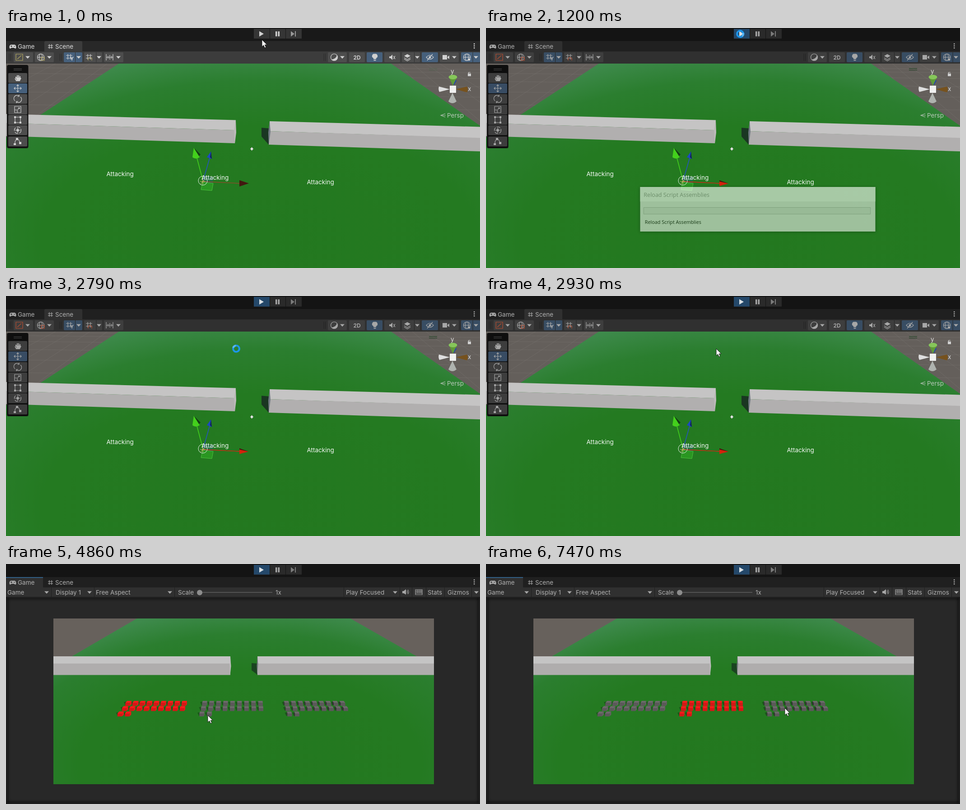
An HTML page for the animation above (8000 ms loop, 1050 by 533 pixels).

```html
<!DOCTYPE html>
<html lang="en">
<head>
<meta charset="utf-8">
<title>Selecting groups in a game editor</title>
<style>
html, body { margin: 0; width: 100%; height: 100%; overflow: hidden; background: #282828; }
svg { display: block; width: 1050px; height: 533px; }
text { font: 13.5px Inter, sans-serif; fill: #dcdcdc; white-space: pre; }
.label { fill: #f4f8f4; }
.line { fill: none; stroke: #d0d0d0; stroke-width: 1.2; }
.solid { fill: #d0d0d0; }
.btn { fill: #4d4d4d; }
.on { fill: #46607c; }
.warn { stroke: #b4a860; }

/* hard switches */
.edit, .game, .idle, .play, .arrow, .busy, #left, #mid { animation: 8s step-end infinite; }
.edit { animation-name: edit; }
.game { animation-name: game; }
.idle { animation-name: idle; }
.play { animation-name: play; }
.arrow { animation-name: arrow; }
.busy { animation-name: busy; }
.warn { animation: warn 8s step-end infinite; }
.squad { color: #6d696b; }
#left { animation-name: pickLeft; }
#mid { animation-name: pickMid; }
@keyframes edit { 0% { visibility: visible } 40.7%, 100% { visibility: hidden } }
@keyframes game { 0% { visibility: hidden } 40.7%, 100% { visibility: visible } }
@keyframes idle { 0% { visibility: visible } 10.8%, 100% { visibility: hidden } }
@keyframes play { 0% { visibility: hidden } 10.8%, 100% { visibility: visible } }
@keyframes arrow { 0% { visibility: visible } 10.8% { visibility: hidden } 34.9%, 100% { visibility: visible } }
@keyframes busy { 0% { visibility: hidden } 10.8% { visibility: visible } 34.9%, 100% { visibility: hidden } }
@keyframes warn { 0% { stroke: #b4a860 } 10.8%, 100% { stroke: #e8603c } }
@keyframes pickLeft { 0% { color: #6d696b } 52.1% { color: #ff1a1a } 65% { color: #6d696b } 100% { color: #6d696b } }
@keyframes pickMid { 0% { color: #6d696b } 81.6%, 100% { color: #ff1a1a } }

/* motion */
#drop { transform-origin: 527px 320px; animation: drop 8s linear infinite; }
@keyframes drop {
  0%, 40.8% { transform: translateY(-3.5px) scaleX(1.012) }
  43.5%, 100% { transform: none }
}
#dialog { transform-origin: 601.5px 402px; animation: dialog 8s linear infinite; }
@keyframes dialog {
  0%, 14% { opacity: 0; transform: scale(.965) }
  15% { opacity: .6; transform: scale(.981) }
  16.6%, 31.2% { opacity: 1; transform: none }
  34.2%, 100% { opacity: 0; transform: scale(.96) }
}
#pointer { animation: pointer 8s linear infinite; }
@keyframes pointer {
  0%, .86% { transform: translate(567px, 26px) }
  .87%, 2.4% { transform: translate(567px, 24px) }
  5.87%, 17% { transform: translate(563px, 13px) }
  20.2%, 40.69% { transform: translate(510px, 117px) }
  40.7%, 41.5% { transform: translate(509px, 121px) }
  43.75% { transform: translate(500px, 147px) }
  48.87%, 51.3% { transform: translate(338px, 303px) }
  57.5% { transform: translate(458px, 331px) }
  60.7%, 61.5% { transform: translate(447px, 336px) }
  67.5% { transform: translate(491px, 325px) }
  71.6%, 74.9% { transform: translate(466px, 309px) }
  77.5% { transform: translate(488px, 311px) }
  79.1%, 86.7% { transform: translate(484px, 320px) }
  89.1%, 90% { transform: translate(703px, 340px) }
  93.3%, 100% { transform: translate(662px, 320px) }
}
#ring { animation: spin 1s linear infinite; }
@keyframes spin { to { transform: rotate(360deg) } }
</style>
</head>
<body>
<svg viewBox="0 0 1050 533">
  <defs>
    <radialGradient id="grass">
      <stop offset="0" stop-color="#23781f"/>
      <stop offset=".6" stop-color="#247a21"/>
      <stop offset=".84" stop-color="#2b7e2f"/>
      <stop offset="1" stop-color="#3e8a4c"/>
    </radialGradient>
    <radialGradient id="field" href="#grass" gradientUnits="userSpaceOnUse" cx="0" cy="0" r="1" gradientTransform="translate(560 470) scale(800 420)"/>
    <radialGradient id="arena" href="#grass" gradientUnits="userSpaceOnUse" cx="0" cy="0" r="1" gradientTransform="translate(540 445) scale(630 345)"/>
    <filter id="soft"><feGaussianBlur stdDeviation="4"/></filter>
    <clipPath id="pane"><path d="M0 73H1050V533H0Z"/></clipPath>
    <clipPath id="screen"><path d="M105 121H948V489H105Z"/></clipPath>
    <path id="caret" class="solid" d="M-5-2.5H5L0 3Z"/>
    <path id="grip" d="M0 57V73M3.5 57V73" stroke="#2a2a2a" stroke-width="1"/>
    <g id="globe" class="line"><circle r="7.5"/><ellipse rx="3.5" ry="7.5"/><path d="M-7.5 0H7.5"/></g>
    <path id="lattice" class="line" d="M-3-6V6M3-6V6M-7-3H7M-7 3H7"/>
  </defs>

  <!-- scene view -->
  <g class="edit">
    <path d="M0 79H1050V533H0Z" fill="#645f5b"/>
    <path id="gridlines" stroke="#8a8682" stroke-opacity=".25" fill="none"/>
    <path d="M250 79H853L1050 217V533H0V243Z" fill="url(#field)"/>
    <path d="M0 191 509 204.500 508 227 0 211Z" fill="#c5c4c4"/>
    <path d="M0 211 508 227 507 256 0 240Z" fill="#b1afaf"/>
    <path d="M509 205 505 227 507 256 510 232Z" fill="#bcbaba"/>
    <path d="M566 221.500 584 223 582 259 566 241Z" fill="#1a3722"/>
    <path d="M584 207 1050 219.500V245L584 229Z" fill="#c5c4c4"/>
    <path d="M583 229 1050 244V274L582 259Z" fill="#b1afaf"/>
    <path d="M584 207 586 230 582 259 581 232Z" fill="#747b85"/>
    <path d="M544.500 264.500 548 268.500 544.500 272.500 541 268.500Z" fill="#e8ece8" stroke="#6c8a6c"/>

    <!-- move handles -->
    <path d="M436 342 459 345 456 361 432 359Z" fill="#2fae25" fill-opacity=".55" stroke="#4bc23c"/>
    <path d="M438 328 460 331 458 345 437 342Z" fill="#2a58b0" fill-opacity=".25"/>
    <path d="M437 338 451 289" stroke="#2550c8" stroke-width="1.5"/>
    <path d="M454 274 445 287 456 291Z" fill="#1e48c0"/><path d="M454 274 452 287 456 291Z" fill="#102450"/>
    <path d="M436 338 423 289" stroke="#45d41c" stroke-width="1.5"/>
    <path d="M416 266 431 281 424 287Z" fill="#123c12"/><path d="M416 266 413 287Q420 293 429 287Z" fill="#43d01c"/>
    <path d="M437 341 517 345" stroke="#92482a" stroke-width="1.300"/>
    <path class="idle" d="M517 338 538 345 517 352Z" fill="#421810"/>
    <g class="play">
      <path d="M437 341 517 345" stroke="#c22c12" stroke-width="1.300"/>
      <path d="M517 338 536 345 517 347Z" fill="#421810"/><path d="M517 341 537 345.500 517 351Z" fill="#d0240c"/>
    </g>
    <circle cx="436" cy="339" r="10" fill="none" stroke="#e4eee4"/>
    <path d="M430 341H442M436 334V347M431 347 441 335" stroke="#d8c070"/>
    <text class="label" x="222.500" y="328.500">Attacking</text>
    <text class="label" x="433" y="336.500">Attacking</text>
    <text class="label" x="666.500" y="346.500">Attacking</text>

    <!-- orientation gizmo -->
    <path d="M991 126 997 116" stroke="#2646a8" stroke-width="3"/>
    <path d="M959 130Q957 136 960 142L983 136Z" fill="#dedede"/>
    <path d="M1021 130Q1025 136 1021 143L997 136Z" fill="#76521e"/>
    <path d="M981 109 990 128 999 109Z" fill="#5f9a38"/><ellipse cx="990" cy="109" rx="9.500" ry="5" fill="#86c65a"/>
    <path d="M980 163 989 144 998 163Q989 171 980 163Z" fill="#aeb2ae"/>
    <path d="M983 128H997V144H983Z" fill="#f0f0f0"/>
    <text x="985" y="101">y</text><text x="1023" y="140">x</text>
    <path d="M1023 101H1030V107H1023Z" class="solid"/><path d="M1024.500 101V98.500H1029" class="line"/>
    <path d="M973 190 963 194 973 198M964 194H974" class="line" stroke-opacity=".75"/>
    <text x="977" y="199" fill-opacity=".8">Persp</text>
    <path d="M937 90H955M937 93.500H955" stroke="#3c6040" stroke-opacity=".5"/>
    <path class="play" d="M937 90H955M937 93.500H955" stroke="#1c3c20"/>

    <!-- chrome -->
    <path d="M0 0H1050V29H0Z" fill="#191919"/><path d="M0 29H1050V52H0Z" fill="#282828"/>
    <path d="M85 52V32Q85 29 88 29H166Q169 29 169 32V52H1050V79H0V52Z" fill="#3c3c3c"/>
    <rect x="2" y="82" width="47.500" height="185" rx="4" fill="#121212"/>
    <path d="M17 90.500H35M17 93.500H35" stroke="#555"/>
    <g id="buttons"></g>
    <use href="#grip" x="7"/><use href="#grip" x="119"/><use href="#grip" x="704"/>
    <path class="line warn" d="M22 58H37V72H22ZM25 69 34 61"/>
    <use href="#globe" x="77" y="65"/><path class="line warn" d="M78 65H85V72H78Z"/>
    <use href="#lattice" x="140" y="64"/><text x="142" y="72" style="font-size:11px;font-weight:700">Y</text>
    <use href="#lattice" x="184" y="64"/><path class="line warn" d="M182 72V68Q186 62 190 68V72" stroke-width="2"/>
    <path class="line" d="M222 58V72M226 62V68M230 60V70M234 62V68M237 58V72M222 65H237"/>
    <circle class="line" cx="727" cy="65" r="7.500"/><path class="solid" d="M721 70A7.500 7.500 0 0 0 733 60Q732 68 721 70Z"/>
    <text x="769.500" y="69.500" style="font-size:12px;font-weight:600">2D</text>
    <path class="solid" d="M817 57.500A5 5 0 0 1 820 67V69H814V67A5 5 0 0 1 817 57.500ZM814.500 70.500H819.500V72.500H814.500Z"/>
    <path class="solid" d="M849 63H852L856 59V71L852 67H849Z"/><path class="line" d="M858 62 862 69M862 62 858 69"/>
    <path class="solid" d="M882 62 889 58 896 62 889 66Z"/><path class="line" d="M882 66 889 70 896 66M882 69 889 73 896 69"/>
    <path class="line" d="M931 65Q939 56 947 65Q939 74 931 65ZM933 72 945 58" stroke-width="1.500"/><circle class="solid" cx="939" cy="65" r="2.500"/>
    <path class="solid" d="M967 60H977V70H967ZM978 64 982 61V69L978 66Z"/>
    <use href="#globe" x="1021" y="65"/><circle class="solid" cx="1026" cy="70" r="2.500"/>
    <!-- palette icons -->
    <path d="M22 108V112M25 105V112M28 105V112M31 107V112M20 112 23 117H30L33 111" fill="none" stroke="#d0d0d0" stroke-width="2"/><path class="solid" d="M22 110H32L30 117H24Z"/>
    <path class="line" d="M26 126V142M18 134H34M23.500 128.500 26 126 28.500 128.500M23.500 139.500 26 142 28.500 139.500M20.500 131.500 18 134 20.500 136.500M31.500 131.500 34 134 31.500 136.500"/>
    <path class="line" d="M20 162A7 7 0 0 1 29 151M32 153A7 7 0 0 1 23 164M29 148V152H25M23 167V163H27"/>
    <path class="line" d="M19 174H33V188H19ZM19 182H25V188M26 181 30 177M27 177H30V180"/>
    <path class="line" d="M20 198H32V210H20Z"/><path class="solid" d="M18 196H22V200H18ZM30 196H34V200H30ZM18 208H22V212H18ZM30 208H34V212H30Z"/>
    <circle class="line" cx="26" cy="227" r="7.500" stroke-dasharray="8 3"/><path class="line" d="M26 221V233M20 227H32"/><path class="solid" d="M23.500 224.500H28.500V229.500H23.500Z"/>
    <path class="line" d="M20 257Q19 249 25 247Q30 248 30 254"/><path class="solid" d="M17 256H22V260H17ZM22 244H27V249H22ZM29 253H34V258H29Z"/>
  </g>

  <!-- game view -->
  <g class="game">
    <path d="M0 0H1050V29H0Z" fill="#191919"/><path d="M0 29H1050V52H0Z" fill="#282828"/>
    <path d="M0 29H82V52H1050V73H0Z" fill="#3c3c3c"/><path d="M0 29H82V31H0Z" fill="#3f78a8"/>
    <path d="M0 73H1050V533H0Z" fill="#282828"/>
    <g clip-path="url(#pane)"><path d="M-1 72H1051V534H-1Z" fill="none" stroke="#111" stroke-width="7" filter="url(#soft)"/></g>
    <g id="bar"></g>
    <path d="M429 63H590" stroke="#686868" stroke-width="2"/><circle cx="429" cy="63.500" r="6" fill="#b0b0b0"/>
    <path class="solid" d="M878 60H881L886 56V68L881 65H878Z"/><path class="line" d="M888 59Q890.500 62 888 65M890 57Q894 62 890 67"/>
    <path class="line" d="M907 57H922V68H907ZM907 60.500H922M907 64.500H922M911 57V64M915 57V64M919 57V64"/>
    <g clip-path="url(#screen)">
      <path d="M105 121H948V489H105Z" fill="#67615c"/>
      <path d="M290 121H763L948 227V489H105V229Z" fill="url(#arena)"/>
      <path d="M105 205H497V221H105Z" fill="#c4c4c4"/><path d="M105 221H497V246.500H105Z" fill="#afadad"/>
      <path d="M497 205 495.500 222 496.500 246.500 498.500 227Z" fill="#c0bebe"/>
      <path d="M544 220 557 221V246L544 236Z" fill="#1a4420"/>
      <path d="M557 205H948V221H557Z" fill="#c4c4c4"/><path d="M557 221H948V246.500H557Z" fill="#afadad"/>
      <path d="M557 205 558.500 222 556.500 246.500 555.500 226Z" fill="#747a7c"/>
      <g id="drop"><g class="squad" id="left"></g><g class="squad" id="mid"></g><g class="squad" id="right"></g></g>
    </g>
  </g>

  <!-- shared chrome -->
  <text x="26" y="45.500">Game</text><text x="109" y="45.500">Scene</text>
  <path class="solid" d="M11 37H19Q23 38 22.500 44Q21 47.500 18 44H12Q9 47.500 7.500 44Q7 38 11 37Z"/>
  <path d="M10 40.500H14M12 38.500V42.500M17 40.500H20" stroke="#282828"/>
  <path class="line" d="M96 36V46M101 36V46M93 39H104M93 43.500H104"/>
  <path class="solid" d="M1036 34H1038.500V36.500H1036ZM1036 38.500H1038.500V41H1036ZM1036 43H1038.500V45.500H1036Z"/>
  <path d="M549 2H584V23.500H549ZM585 2H619V23.500H585ZM620 2H655V23.500H620Z" fill="#353535"/>
  <path class="solid" d="M561 7 571 13 561 19ZM597 7.500H600.500V18.500H597ZM602.500 7.500H606V18.500H602.500Z"/>
  <path d="M631 7 639 13 631 19ZM640 7H642V19H640Z" fill="#999"/>
  <g class="play"><path d="M0 0H1050V73H0Z" fill-opacity=".2"/></g>
  <g class="edit"><g class="tint"><path id="shade" d="M0 73H1050V79H0ZM2 82H49.500V267H2Z" fill-opacity=".2"/></g></g>
  <g class="play"><path d="M549 2H584V23.500H549Z" fill="#24486a"/><path d="M561 7 571 13 561 19Z" fill="#d8dfe4"/></g>

  <g id="dialog">
    <path d="M336 353H868V454H336Z" opacity=".45" filter="url(#soft)"/>
    <path d="M336.500 352H867.500V453H336.500Z" fill="#f0f0f0"/><path d="M336.500 352H867.500V385H336.500Z" fill="#fff"/>
    <path d="M344.500 398.500H856.500V413.500H344.500Z" fill="#e6e6e6" stroke="#bcbcbc"/>
    <text x="344.500" y="374" style="font:12.8px 'Open Sans',sans-serif;fill:#9b9b9b">Reload Script Assemblies</text>
    <text x="347" y="436" style="font:11px 'Open Sans',sans-serif;fill:#111">Reload Script Assemblies</text>
  </g>

  <g id="pointer">
    <path class="arrow" d="M0 0V15.500L3.600 12.200 6.200 18 8.800 16.900 6.300 11.200H11Z" fill="#fff" stroke="#111" stroke-width=".9"/>
    <g class="busy"><g id="ring" fill="none" stroke-width="3.800">
      <circle r="7" stroke="#1c98f0"/><path d="M0-7A7 7 0 0 1 6.500-2.500" stroke="#58b8fa"/>
    </g></g>
  </g>
</svg>
<script>
const $ = id => document.getElementById(id);
const caret = (x, y) => `<use href="#caret" x="${x}" y="${y}"/>`;
const button = (x, y, w, h, on) =>
  `<rect x="${x}" y="${y}" width="${w}" height="${h}" rx="2" class="${on ? 'on' : 'btn'}"/>`;

// the strip below the game bar and the palette darken only while playing
$('shade').parentNode.setAttribute('class', 'tint');
$('shade').animate(
  [{ opacity: 0, offset: 0 }, { opacity: 0, offset: .108 }, { opacity: 1, offset: .108 },
   { opacity: 1, offset: .407 }, { opacity: 0, offset: .407 }, { opacity: 0, offset: 1 }],
  { duration: 8000, iterations: Infinity });

// scene toolbar: left edge, width, highlighted, caret position
const tools = [
  [17, 43, 0, 48], [64, 42, 0, 96], [128, 41, 1, 161], [173, 40, 0, 206], [217, 43, 0, 249],
  [713, 42, 0, 745], [760, 35], [799, 35, 1], [838, 35], [877, 40, 0, 911],
  [921, 36, 1], [961, 42, 0, 993], [1008, 42, 1, 1041]
];
$('buttons').innerHTML =
  tools.map(([x, w, on, c]) => button(x, 54, w, 22, on) + (c ? caret(c, 65) : '')).join('') +
  [100, 123, 146.5, 170, 193, 216, 241].map((y, i) => button(5, y, 42, 22, i === 1)).join('') +
  [153.5, 200, 904.5, 1034].map(x => `<path d="M${x} 54V76" stroke="#303030"/>`).join('');

// faint floor lines outside the field
let lines = '';
for (let i = 0; i < 7; i++) {
  const y = 84 + i * i * 2.6 + i * 5;
  lines += `M0 ${y - 4}L1050 ${y + 8}M${-120 + i * 60} 200L${110 + i * 38} 79M${1180 - i * 60} 215L${960 - i * 30} 79`;
}
$('gridlines').setAttribute('d', lines);

// game toolbar
const words = [
  [3, 'Game'], [110, 'Display 1'], [199, 'Free Aspect'], [381, 'Scale'], [597, '1x'],
  [753, 'Play Focused'], [934, 'Stats'], [978, 'Gizmos']
];
$('bar').innerHTML =
  words.map(([x, s]) => `<text x="${x}" y="67.5">${s}</text>`).join('') +
  [90, 185, 363, 862, 1042].map(x => caret(x, 63)).join('') +
  [100, 195, 373, 748, 872, 899, 930, 971, 1031]
    .map(x => `<path d="M${x}.5 52V73" stroke="#262626"/>`).join('');

// cubes in rows of nine, seen from above the middle of the field
const EYE = 527;
const poly = (points, fill, alpha = 1) =>
  `<path d="M${points.map(p => p.map(v => v.toFixed(1)).join(' ')).join('L')}Z" fill="${fill}" fill-opacity="${alpha}"/>`;

function cube(x, y) {
  const k = (EYE - x) * .015, l = x - 5 - k / 2, r = l + 10;
  const top = y - 1, back = y - 5.5, foot = y + 5.5, edge = k > 0 ? r : l;
  const side = [[edge, top], [edge + k, back], [edge + k, y + 1.5], [edge, foot]];
  return poly([[l, top], [l + k, back], [r + k, back], [r, top]], 'currentColor') +
    poly(side, 'currentColor') + poly(side, '#000', k > 0 ? .08 : .55) +
    poly([[l, top], [r, top], [r, foot], [l, foot]], 'currentColor') +
    poly([[l, top], [r, top], [r, foot], [l, foot]], '#000', .16);
}
const shadow = (x, y) =>
  poly([[x - 10, y - 3], [x, y - 4], [x, y + 5], [x - 7, y + 4]], '#143d18', .6);

function squad(start) {
  const spots = [];
  [[9, 15.45, 309.5], [9, 15.9, 321], [2, 16.5, 333]].forEach(([n, step, y]) => {
    for (let i = 0; i < n; i++) spots.push([EYE + (start + i) * step, y]);
  });
  return spots.map(p => shadow(...p)).join('') + spots.map(p => cube(...p)).join('');
}
$('left').innerHTML = squad(-16.55);
$('mid').innerHTML = squad(-5.63);
$('right').innerHTML = squad(6.1);
</script>
</body>
</html>
```
